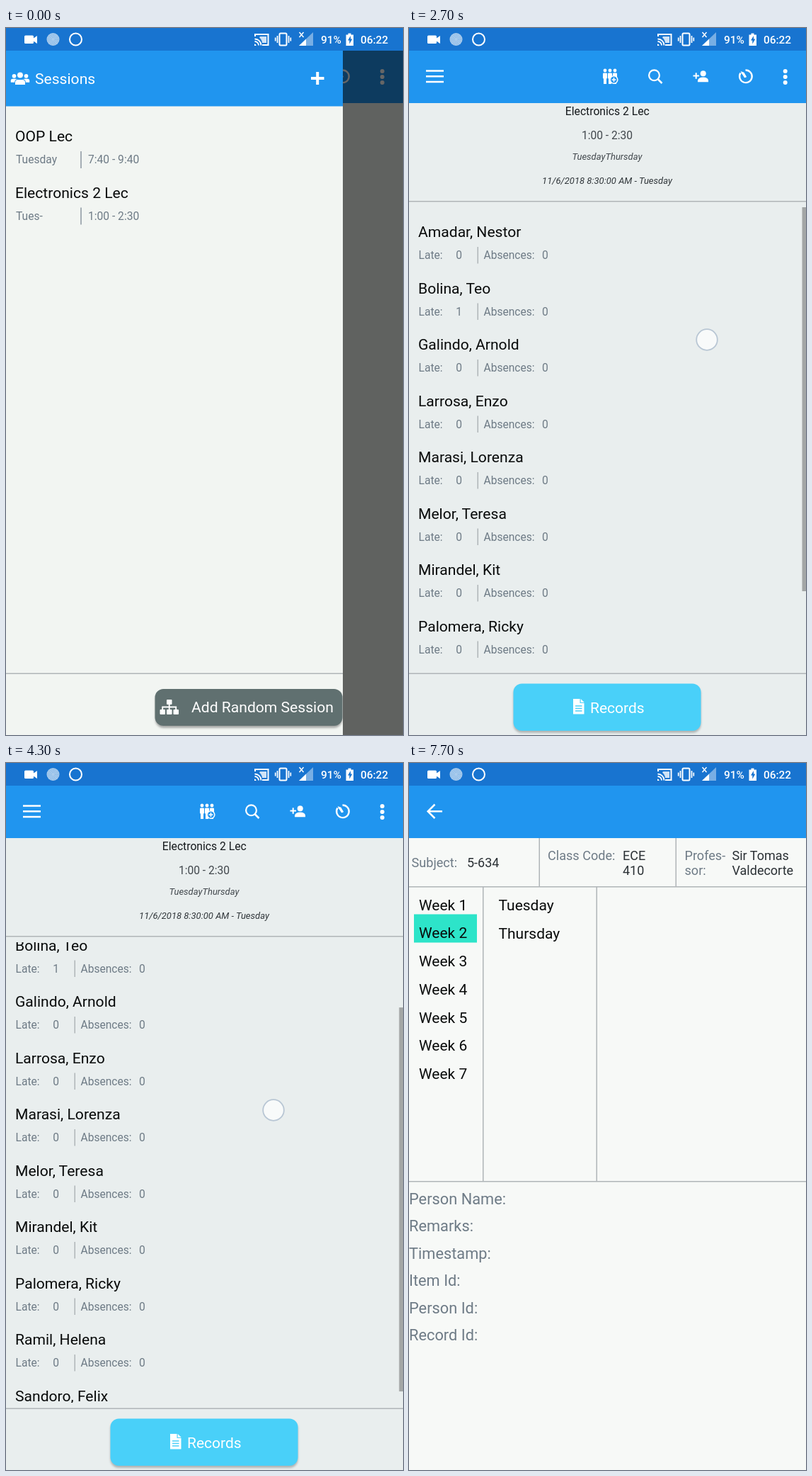
Animation of 561x998 px, one loop 8000 ms. Source, as an HTML page:

```html
<!DOCTYPE html>
<html lang="en">
<head>
<meta charset="utf-8">
<title>Attendance app</title>
<style>
html, body { margin: 0; width: 100%; height: 100%; overflow: hidden; background: #f2f5f2; }
svg { display: block; width: 100%; height: 100%; font-family: Roboto, sans-serif; }
</style>
</head>
<body>
<svg id="stage" viewBox="0 0 561 998"></svg>
<script>
const LOOP = 8000, STEP = 100, ROW = 79.5, MAX_SCROLL = 129;
const BLUE = '#2095ef', TEAL = '#2de4c9', INK = '#080a0a', GREY = '#6e7b86', RULE = '#b0b5b8';

const text = (x, y, size, str, fill = INK, extra = '') =>
  `<text x="${x}" y="${y}" font-size="${size}" fill="${fill}" ${extra}>${str}</text>`;
const rect = (x, y, w, h, fill, extra = '') =>
  `<rect x="${x}" y="${y}" width="${w}" height="${h}" fill="${fill}" ${extra}/>`;
const dot = (x, y, r, extra = '') => `<circle cx="${x}" cy="${y}" r="${r}" ${extra}/>`;
const path = (d, extra = '') => `<path d="${d}" ${extra}/>`;
const line = (d, w, color = '#fff') => path(d, `fill="none" stroke="${color}" stroke-width="${w}"`);
const group = (id, body, extra = '') => `<g id="${id}" ${extra}>${body}</g>`;

const statusBar = rect(0, 0, 561, 32, '#1874d0') + `<g fill="#fff">` +
  rect(26, 10.5, 13, 11.5, '#fff', 'rx="1.5"') + path('M38 15l6-4v11l-6-4z') +
  dot(66.5, 16, 9, 'fill="#a9cbec"') +
  [3, 5, 7].map(r => dot(66.5, 16, r, 'fill="none" stroke="#6ca9e2" stroke-width=".7" stroke-dasharray="1.5 1"')).join('') +
  dot(98.5, 16, 8.5, 'fill="none" stroke="#fff" stroke-width="2"') +
  line('M352 12V9H370.500V24H362', 2) +
  line('M351.500 15.500a9 9 0 0 1 9 9M351.500 19a5.500 5.500 0 0 1 5.500 5.500', 1.8) + path('M351 22.500a2.500 2.500 0 0 1 2.500 2.500h-2.500z') +
  path('M359 12h9v9h-6q-.5-5-4-7.500z', 'opacity=".8"') +
  rect(386.5, 7.500, 10, 17, 'none', 'rx="1.500" stroke="#fff" stroke-width="2"') +
  line('M383.500 11v10M380.700 13.500v5M399.500 11v10M402.300 13.500v5', 1.7) +
  path('M434 6V25H414z', 'opacity=".42"') + path('M424 15.500V25H414z') +
  line('M414.500 6l6 7M420.500 6l-6 7', 1.5) +
  text(445, 21.5, 15.4, '91%', '#fff', 'font-weight="500"') +
  path('M483.500 7.500h4v2h3.500V25H480.500V9.500h3z') + path('M487 11l-4 6.500h2.300V22.500l4-7h-2.300z', 'fill="#1874d0"') +
  text(501, 21.5, 15.4, '06:22', '#fff', 'font-weight="500"') + '</g>';

const toolbar = rect(0, 32, 561, 74, BLUE) +
  line('M24 60.500H49M24 68.300H49M24 76H49', 2.4) + '<g fill="#fff">' +
  [277, 284, 291].map(x => dot(x, 60, 2.4) + rect(x - 3, 63.500, 6, 8, '#fff', 'rx="1"') + rect(x - 2, 71, 4, 8, '#fff')).join('') +
  dot(289.5, 73, 5.3, `fill="${BLUE}" stroke="#fff" stroke-width="1.5"`) + line('M286.500 73h6M289.500 70v6', 1.5) +
  dot(346.5, 66.8, 7.4, 'fill="none" stroke="#fff" stroke-width="2.2"') + line('M352 72.500L357.500 78', 2.5) +
  line('M401.500 67.500H410M405.700 63.300V71.700', 2) + dot(415.7, 64.3, 4) + path('M408 76.300V74q1-4.500 7.700-4.500T423 74V76.300z') +
  line('M475.500 59.500A8.800 8.800 0 1 1 468.500 63.500M476 69L470 62.500', 2.3) + path('M468.500 61l5 1.800l3.500 6.500-3 1z') +
  [61, 69, 77].map(y => dot(531.7, y, 3)).join('') + '</g>';

const names = ['Amadar, Nestor', 'Bolina, Teo', 'Galindo, Arnold', 'Larrosa, Enzo', 'Marasi, Lorenza',
  'Melor, Teresa', 'Mirandel, Kit', 'Palomera, Ricky', 'Ramil, Helena', 'Sandoro, Felix'];
const student = (name, i) => `<g transform="translate(0 ${i * ROW})">` +
  text(13, 295, 21.1, name) + text(13.5, 326, 15.6, 'Late:', GREY) + text(66.3, 326, 15.6, i === 1 ? 1 : 0, GREY) +
  rect(96.5, 309, 1.5, 23.5, RULE) + text(105.5, 326, 15.6, 'Absences:', GREY) + text(188, 326, 15.6, 0, GREY) + '</g>';

const mid = 'text-anchor="middle"', slant = mid + ' font-style="italic"';
const classPage = rect(0, 106, 561, 892, '#e9eeee') +
  text(280.3, 123, 15.7, 'Electronics 2 Lec', '#15191c', mid) +
  text(280, 157, 15.6, '1:00 - 2:30', '#42484d', mid) +
  text(280, 186.3, 13, 'TuesdayThursday', '#42484d', slant) +
  text(280, 220, 13, '11/6/2018 8:30:00 AM - Tuesday', '#30363a', slant) +
  rect(0, 244, 561, 1.5, RULE) +
  `<g clip-path="url(#listClip)">` + group('list', names.map(student).join('')) +
  group('glow', dot(310, 68.5 - 886, 886, 'fill="#2196f3" opacity=".15"')) +
  rect(555.5, 253, 5.5, 542, '#a3a6a6', 'id="thumb"') + '</g>' +
  rect(0, 910.5, 561, 1.5, RULE) +
  rect(147.5, 928, 265, 67, '#7d8585', 'rx="12" opacity=".55" filter="url(#soft)"') +
  rect(147.5, 925.5, 265, 66.5, '#49d0f9', 'rx="12"') +
  path('M232 947h9.500v6h6V968.500H232zM242.700 947l5 5h-5z', 'fill="#fff"') +
  line('M235 957h9.500M235 960.500h9.500M235 964h9.500', 1.5, '#49d0f9') +
  text(256, 966.5, 21, 'Records', '#fff');

const session = (y, title, day, hours) => text(13, y, 21.1, title) + text(14, y + 31, 15.6, day, GREY) +
  rect(105, y + 14, 2, 24, '#a5aeb5') + text(116, y + 31, 15.6, hours, GREY);
const bust = (x, y, s) => `<g transform="translate(${x} ${y}) scale(${s})">` +
  dot(0, -5, 4.5) + path('M-7.500 9V5q0-4 4-4h7q4 0 4 4v4z') + '</g>';
const box = (x, y) => rect(x, y, 7.500, 7, '#fff', 'rx="1"');
const drawer = rect(0, 32, 476, 966, '#f2f5f2') + rect(0, 32, 476, 78.5, BLUE) +
  '<g fill="#fff">' + bust(11.500, 71, .63) + bust(28.500, 71, .63) +
  `<g stroke="${BLUE}" stroke-width="1">` + bust(20, 71.5, 1) + '</g></g>' +
  text(41, 79, 21.1, 'Sessions', '#fff') + line('M431 71H449.500M440.200 62V80', 4) +
  rect(0, 198, 476, 79.5, TEAL, 'id="pick"') +
  session(160, 'OOP Lec', 'Tuesday', '7:40 - 9:40') + session(239.5, 'Electronics 2 Lec', 'Tues-', '1:00 - 2:30') +
  rect(0, 910.5, 476, 1.5, RULE) +
  rect(211, 936, 264, 52, '#666', 'rx="12" opacity=".55" filter="url(#soft)"') +
  rect(210.5, 933, 265, 52, '#607070', 'rx="12"') +
  box(227, 948) + box(217.500, 962) + box(227, 962) + box(236.500, 962) +
  line('M230.700 954V963M221.200 963V958.500H240.200V963', 1.9) +
  text(262, 966, 21.1, 'Add Random Session', '#fff');

const fields = ['Person Name:', 'Remarks:', 'Timestamp:', 'Item Id:', 'Person Id:', 'Record Id:'];
const dark = '#2b3135';
const recordPage = rect(0, 32, 561, 966, '#f7f9f7') + rect(0, 32, 561, 74, BLUE) +
  line('M47 68.300H27M36.500 58.500L26.700 68.300L36.500 78', 2.5) +
  text(3.5, 147, 18.1, 'Subject:', GREY) + text(82, 147, 18, '5-634', dark) +
  text(196, 136.5, 18.1, 'Class Code:', GREY) + text(302, 136.5, 18, 'ECE', dark) + text(302, 157.5, 18, '410', dark) +
  text(389.5, 136.5, 18.1, 'Profes-', GREY) + text(389.5, 157.5, 18.1, 'sor:', GREY) +
  text(456.5, 136.5, 18, 'Sir Tomas', dark) + text(456.5, 157.5, 18, 'Valdecorte', dark) +
  [[183.5, 106, 68], [376.5, 106, 68], [104, 175, 415], [264.5, 175, 415]].map(([x, y, h]) => rect(x, y, 1.5, h, RULE)).join('') +
  rect(0, 174, 561, 1.5, RULE) + rect(0, 590, 561, 1.5, RULE) +
  rect(7, 213.5, 89, 40, TEAL, 'id="week"') +
  Array.from({ length: 7 }, (_, i) => text(14, 207.7 + i * 39.75, 21, `Week ${i + 1}`)).join('') +
  group('days', text(126.5, 207.7, 21, 'Tuesday') + text(126.5, 247.5, 21, 'Thursday')) +
  fields.map((f, i) => text(0, 623 + i * 38.4, 21.8, f, GREY)).join('');

const stage = document.getElementById('stage');
stage.innerHTML = `<defs><clipPath id="listClip">${rect(0, 253, 561, 650, '#000')}</clipPath>
  <filter id="soft" x="-5%" y="-20%" width="110%" height="140%"><feGaussianBlur stdDeviation="1.8"/></filter></defs>` +
  rect(0, 0, 561, 998, '#f2f5f2') + toolbar + group('classPage', classPage) +
  rect(0, 32, 561, 966, '#000', 'id="scrim" opacity=".6"') + group('drawer', drawer) +
  group('recordPage', recordPage) + statusBar +
  dot(0, 0, 14.8, 'id="touch" fill="#fafcfc" fill-opacity=".85" stroke="#b8c6d4" stroke-width="1.8"');

const ui = {};
stage.querySelectorAll('[id]').forEach(el => ui[el.id] = el);
const set = (el, name, value) => el.setAttribute(name, value);
const show = (el, on) => set(el, 'display', on ? 'inline' : 'none');

// Linear blend through rows of [time, ...values].
function track(rows, t) {
  if (t <= rows[0][0]) return rows[0].slice(1);
  for (let i = 1; i < rows.length; i++) {
    const a = rows[i - 1], b = rows[i];
    if (t <= b[0]) return a.slice(1).map((v, j) => v + (b[j + 1] - v) * (t - a[0]) / (b[0] - a[0]));
  }
  return rows[rows.length - 1].slice(1);
}

const gestures = [
  [[100, 262, 240], [300, 262, 240]],
  [[2000, 421, 440], [2300, 416, 330], [2700, 421, 440], [2900, 421, 440], [3200, 400, 311], [3500, 372, 440], [3800, 351, 588]],
  [[4100, 380, 600], [4300, 378, 490], [4500, 376, 600], [4700, 370, 660]],
  [[5000, 290, 960], [5200, 290, 960]],
  [[6600, 50, 206], [6800, 50, 208]],
  [[7200, 50, 236], [7400, 50, 236]]
];
const scrollKeys = [[2000, 0], [2300, 110], [2700, 0], [2900, 0], [3200, MAX_SCROLL], [3500, 0], [4100, 0], [4300, 110], [4500, 0]];
const glowKeys = [[3500, 0], [3800, 1], [3900, .8], [4100, 0], [4500, 0], [4700, .55], [5000, 0]];
const barKeys = [[5000, 1], [5300, 0]];

function draw(t) {
  show(ui.drawer, t < 1400);
  show(ui.scrim, t < 1400);
  show(ui.classPage, t >= 1400 && t < 5700);
  show(ui.recordPage, t >= 5700);

  const slide = t < 900 ? 0 : t < 1000 ? -250 : -473;
  set(ui.drawer, 'transform', `translate(${slide} 0)`);
  show(ui.pick, t >= 300);

  const [scroll] = track(scrollKeys, t), [glow] = track(glowKeys, t);
  set(ui.list, 'transform', `translate(0 ${-scroll})`);
  set(ui.thumb, 'y', 253 + scroll / MAX_SCROLL * 108);
  set(ui.thumb, 'opacity', track(barKeys, t)[0]);
  show(ui.glow, glow > 0);
  set(ui.glow, 'transform', `translate(0 253) scale(1 ${glow})`);

  show(ui.week, t >= 6700);
  set(ui.week, 'y', t < 7300 ? 174.5 : 213.5);
  show(ui.days, t >= 7300);

  const move = gestures.find(g => t >= g[0][0] && t <= g[g.length - 1][0]);
  show(ui.touch, move);
  if (move) {
    const [x, y] = track(move, t);
    set(ui.touch, 'cx', x);
    set(ui.touch, 'cy', y);
  }
}

const start = performance.now();
function tick() {
  const t = (performance.now() - start) % LOOP;
  draw(Math.floor(t / STEP) * STEP);
  requestAnimationFrame(tick);
}
tick();
</script>
</body>
</html>
```
